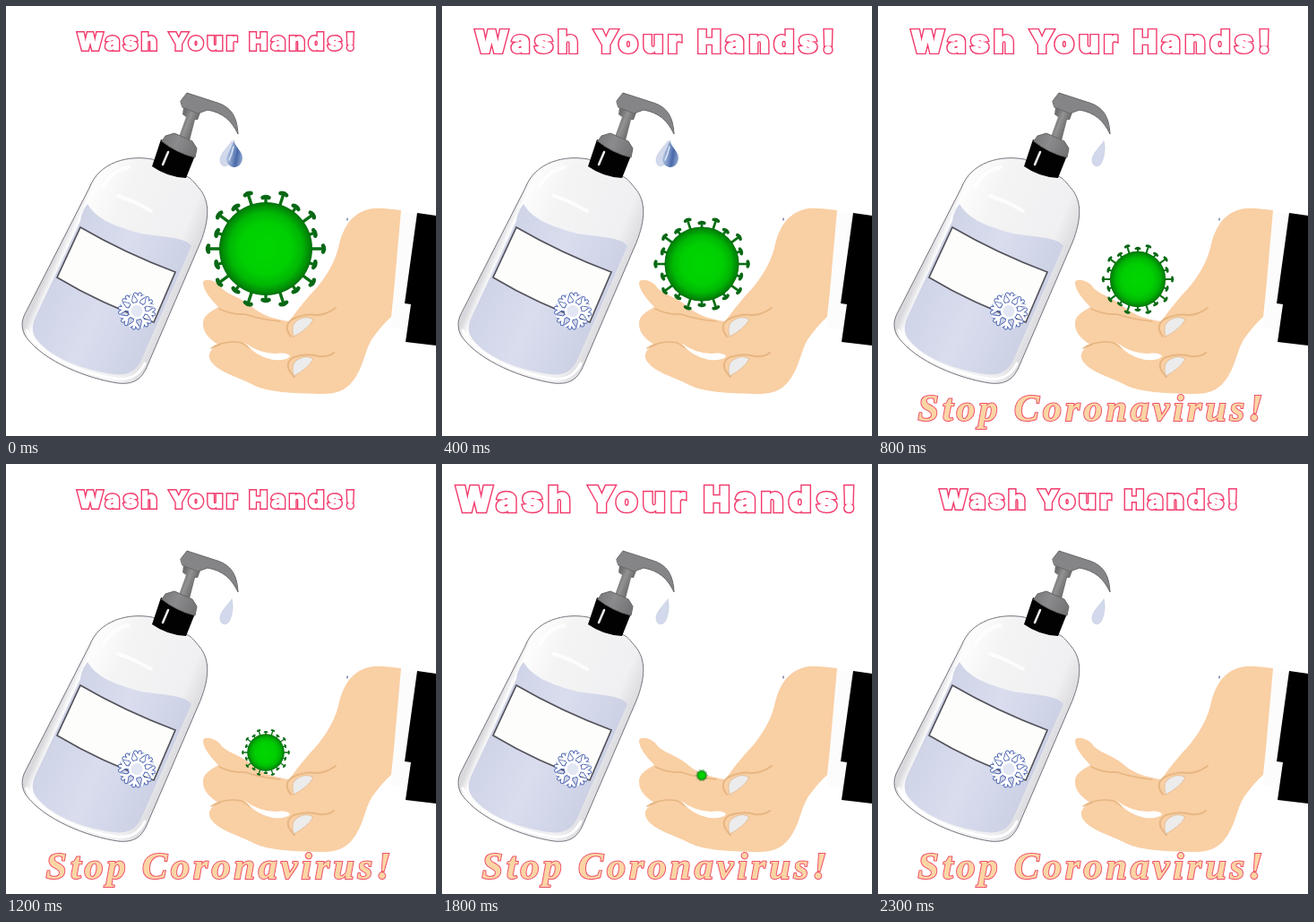
An HTML page with a canvas that plays this animation: 480x480 px, repeating every 2.4 s.

```html
<!DOCTYPE html>
<html lang="en">
<head>
<meta charset="utf-8">
<title>Wash Your Hands!</title>
<style>
html, body { margin: 0; width: 100%; height: 100%; overflow: hidden; background: #fff; }
canvas { display: block; width: 480px; height: 480px; }
</style>
</head>
<body>
<canvas id="stage" width="480" height="480"></canvas>
<script>
const ctx = document.getElementById('stage').getContext('2d');
const STEP = 100, STEPS = 24;

function shape(d, fill, line, width = 1) {
  const p = new Path2D(d);
  if (fill) { ctx.fillStyle = fill; ctx.fill(p); }
  if (line) { ctx.strokeStyle = line; ctx.lineWidth = width; ctx.stroke(p); }
}

function linear(x0, y0, x1, y1, ...stops) {
  const g = ctx.createLinearGradient(x0, y0, x1, y1);
  stops.forEach(([at, color]) => g.addColorStop(at, color));
  return g;
}

// Outlined text, its glyphs thickened by `bold` before the rim is added.
function lettering(text, font, spacing, x, y, scale, fill, line, bold, rim) {
  ctx.save();
  ctx.translate(x, y);
  ctx.scale(scale, scale);
  ctx.font = font;
  ctx.letterSpacing = spacing + 'px';
  ctx.textAlign = 'center';
  ctx.lineJoin = 'miter';
  ctx.miterLimit = 3;
  for (const [color, width] of [[line, bold + 2 * rim / scale], [fill, bold]]) {
    ctx.strokeStyle = ctx.fillStyle = color;
    ctx.lineWidth = width;
    ctx.strokeText(text, spacing / 2, 0);
    ctx.fillText(text, spacing / 2, 0);
  }
  ctx.restore();
}

function drawBottle() {
  const shell = linear(52, 285, 192, 345, [0, '#d9d9dd'], [.06, '#fdfdfd'],
    [.3, '#f4f4f5'], [.8, '#f0f0f2'], [.94, '#dcdce0'], [1, '#aaaab0']);
  shape('M163 171C137 166 104 174 93 203L21 344C17 352 17 361 22 369C42 397 91 416 125 421C143 423 152 416 158 401L217 264C227 239 228 218 216 204C210 197 207 192 201 190Z', shell, '#77737d');
  const liquid = linear(60, 290, 180, 345, [0, '#cfd4e7'], [.45, '#d9ddee'], [1, '#cbd0e4']);
  shape('M91 221C101 238 121 246 151 254C176 258 201 258 207 268L152 393C146 408 136 413 120 411C89 407 51 394 34 372C28 364 29 356 33 347L83 240C84 232 87 226 91 221Z', liquid);
  shape('M23 362C36 389 82 410 123 416C140 418 149 411 155 399', null, '#fff', 3);
  shape('M125 212Q142 217 162 229M109 201Q118 184 137 180', null, '#ffffffcc', 4);
  shape('M83 247Q133 276 189 297L165 353Q107 333 57 303Z', '#fdfefc', '#55535c', 1.7);

  shape('M198 113L217 119L214 127L211 127L205 150L193 146L201 124L197 121Z', linear(196, 130, 211, 136, [0, '#707070'], [.4, '#929292'], [1, '#686868']));
  shape('M195 106L202 97L236 108C251 113 258 123 259 143C252 128 242 119 225 116L214 120L197 113Z', '#858588', '#68686b');
  shape('M173 149L163 179Q180 191 201 192L211 167Z', '#020202');
  shape('M174 151L178 145L188 142L208 151L213 159L211 169Q190 164 174 151Z', linear(177, 147, 211, 163, [0, '#7b7b7d'], [.4, '#8b8b8d'], [1, '#747476']), '#666');
  shape('M181 163L175 177', null, '#eee', 2.5);
}

function drawFlake() {
  ctx.save();
  ctx.translate(146, 340.5);
  ctx.rotate(.18);
  const arm = 'M0 -8V-19M-5 -18L0 -13L5 -18';
  for (const [color, width, dash] of [['#4a62b0', 4.6, [3, 2]], ['#fff', 2.8, []]]) {
    ctx.setLineDash(dash);
    for (let i = 0; i < 8; i++) {
      shape(arm, null, color, width);
      ctx.rotate(Math.PI / 4);
    }
    shape('M8 0A8 8 0 1 1 -8 0A8 8 0 1 1 8 0', '#e3e7f4', color, width);
  }
  ctx.restore();
}

function drawHand() {
  shape('M440 230L460 232L445 332H452L446 362L430 359Z', '#fcfcfc');
  shape('M459 231L480 234V379L446 375L452 333L445 332Z', '#000');
  shape('M441 228C425 226 411 224 401 228C382 235 375 252 371 270C366 290 353 309 339 323Q326 338 316 352C302 350 287 346 276 337C263 325 246 322 240 314C235 306 220 303 220 309C220 317 229 328 237 336C229 341 219 346 220 355C220 367 230 373 238 379C228 382 224 389 229 397C238 409 256 413 274 422C292 432 322 432 347 433C371 434 382 428 391 413C401 397 401 380 412 367Q421 355 430 347L433 318Z', '#f9cfa4');
  const crease = '#e7b681';
  ctx.lineCap = 'round';
  shape('M238 338Q252 345 267 344Q284 350 306 352M232 380Q248 373 263 376Q277 387 295 389M229 382L239 378', null, crease, 1.5);
  shape('M318 369Q309 357 319 350Q333 343 346 345Q357 345 368 337M322 414Q308 400 321 392Q336 387 349 391Q360 392 366 387', null, crease, 2);
  shape('M267 376Q281 387 300 388Q315 386 317 391Q314 396 298 395Q278 391 267 376Z', '#fff');
  const nail = 'M321 369Q317 354 327 350Q335 345 343 350Q337 361 321 369Z';
  shape(nail, '#ececec', '#d9ae82', .6);
  ctx.save();
  ctx.translate(0, 44);
  shape(nail, '#ececec', '#d9ae82', .6);
  ctx.restore();
  shape('M381 237V239', null, '#333d76', 1);
}

function drawDrop(dark) {
  shape('M252 151C247 158 239 165 239 172C239 180 247 181 250 174C253 167 254 157 252 151Z', '#d2d9ec', '#bfc8df', .6);
  if (!dark) return;
  shape('M254 149C253 158 247 164 246 171C247 183 263 183 264 170C264 162 256 158 254 149Z', linear(246, 165, 264, 168, [0, '#b9c8e5'], [.35, '#829cc9'], [.65, '#4969a8'], [1, '#8da5cf']));
  shape('M254 157Q252 166 249 172', null, '#dbe5f5', 1.5);
}

function drawVirus(frame) {
  const scale = 1 - frame / 20;
  if (scale < .01) return;
  ctx.save();
  ctx.translate(290, 271 + frame * 4.25);
  ctx.scale(scale, scale);
  ctx.lineCap = 'round';
  for (let i = 0; i < 20; i++) {
    const reach = i % 2 ? 57 : 64;
    ctx.save();
    ctx.rotate(i * Math.PI / 10);
    shape(`M48 0H${reach}`, null, '#087012', 3.4);
    shape(`M${reach} -3.5Q${reach + 2} 0 ${reach} 3.5`, null, '#086715', 4.5);
    ctx.restore();
  }
  const glow = ctx.createRadialGradient(0, 0, 0, 0, 0, 52);
  [[0, '#00d600'], [.55, '#00cf02'], [.78, '#00b704'], [.94, '#008907'], [1, '#006d0b']]
    .forEach(([at, color]) => glow.addColorStop(at, color));
  shape('M52 0A52 52 0 1 1 -52 0A52 52 0 1 1 52 0', glow);
  ctx.restore();
}

function draw(frame) {
  ctx.fillStyle = '#fff';
  ctx.fillRect(0, 0, 480, 480);
  const late = frame >= 6;
  const beat = 6 - Math.abs(frame % 12 - 6);
  const size = (313 + beat * 23) / 451;
  lettering('Wash Your Hands!', '900 38px Inter, sans-serif', 6.4,
    234.5 + beat * .67, 39.5 + 13.5 * size, size, '#fff', '#f23b6c', 1.6, 1.4);
  drawBottle();
  drawFlake();
  drawHand();
  drawDrop(!late);
  drawVirus(frame);
  if (late) {
    lettering('Stop Coronavirus!', 'italic 700 42px "Liberation Serif", serif', 4,
      237, 463, 1, '#fbd5a4', '#ee526b', .1, 1);
  }
}

let start;
function tick(now) {
  start ??= now;
  draw(Math.floor((now - start) / STEP) % STEPS);
  requestAnimationFrame(tick);
}
draw(0);
requestAnimationFrame(tick);
</script>
</body>
</html>
```
